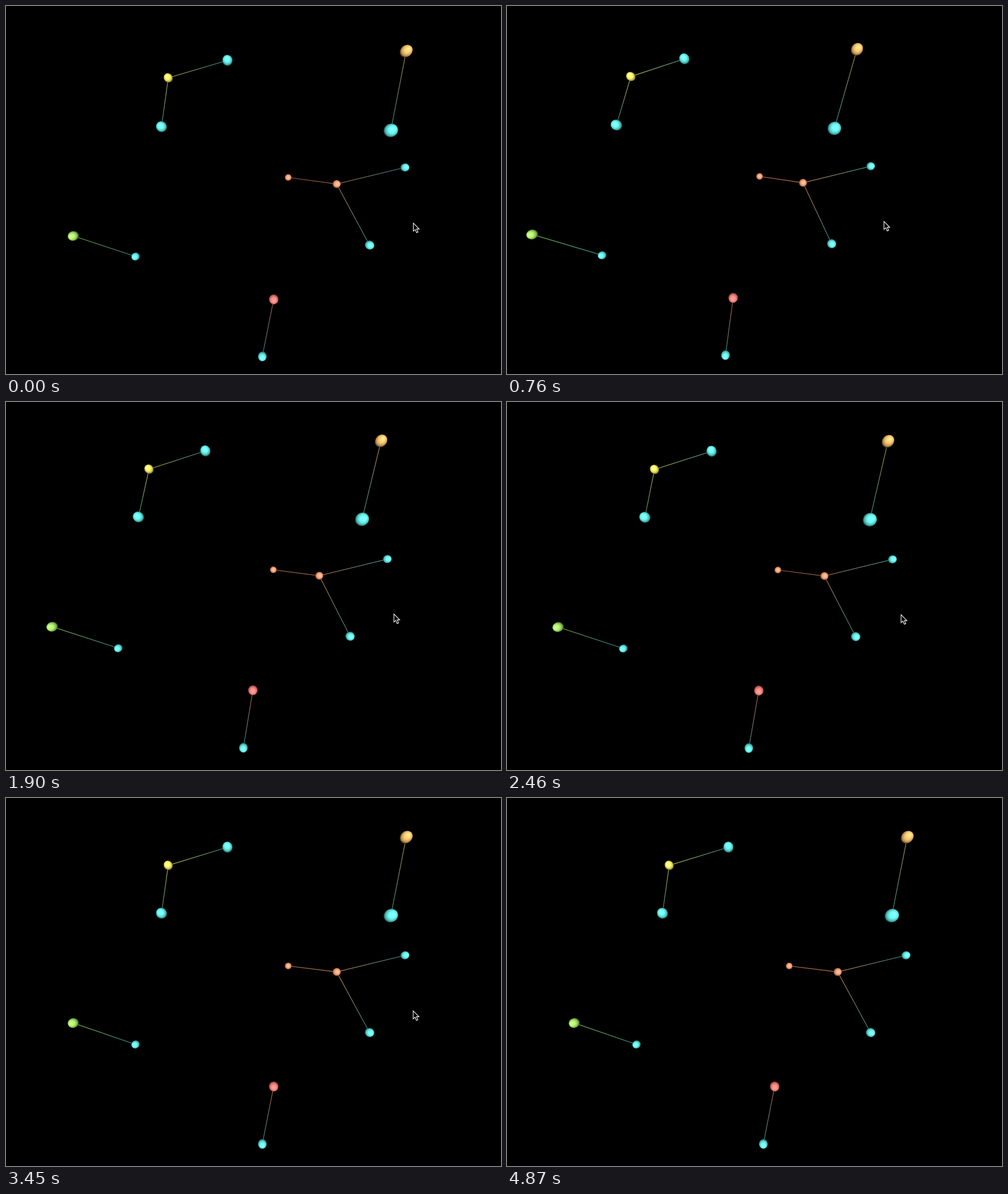
An HTML page with a canvas for the animation above (5200 ms loop, 868 by 645 pixels).

```html
<!DOCTYPE html>
<html>
<head>
<meta charset="utf-8">
<style>
  html, body { margin: 0; width: 100%; height: 100%; overflow: hidden; background: #000; }
  canvas { display: block; }
</style>
</head>
<body>
<canvas id="stage" width="868" height="645"></canvas>
<script>
const ctx = document.getElementById('stage').getContext('2d');
const W = 868, H = 645, LOOP = 5200;
const FOCAL = H / 2 / Math.tan(Math.PI / 6);

const TEAL = [92, 242, 234], YELLOW = [250, 240, 96], ORANGE = [252, 192, 100],
      GREEN = [164, 234, 96], SALMON = [255, 158, 112], RED = [255, 122, 116];

// near: pixels moved per unit of camera pan, which also sets the size
const ball = (x, y, near, color = TEAL) => ({ x, y, near, color });

// Each molecule is a hub followed by the balls tied to it
const molecules = [
  [ball(284.5, 126, 67.5, YELLOW), ball(388.3, 95.3, 77.5), ball(272.7, 211.5, 81)],
  [ball(701.8, 79, 88.3, ORANGE), ball(674.8, 218, 101)],
  [ball(579.8, 312, 61, SALMON), ball(494.8, 300.5, 52, SALMON), ball(699.5, 283, 62), ball(637.5, 419, 68.5)],
  [ball(118, 403, 74, GREEN), ball(227.2, 439, 60.5)],
  [ball(469.4, 514, 73, RED), ball(449.5, 614, 66.5)]
];

// Swing smoothly between turning points [time, value]
function swing(t, ...turns) {
  const i = turns.findIndex(([time]) => time > t);
  if (i < 0) return turns[turns.length - 1][1];
  if (i === 0) return turns[0][1];
  const [t0, a] = turns[i - 1], [t1, b] = turns[i];
  return a + (b - a) * (1 - Math.cos(Math.PI * (t - t0) / (t1 - t0))) / 2;
}

const panX = t => swing(t, [0, 0], [548, -1.6], [1290, 1.574], [1340, 1.574],
  [2075, -.815], [2140, -.815], [2850, .204], [3000, .204], [3450, 0]);
const panY = t => swing(t, [30, 0], [2100, -.126], [2850, -.104], [3000, -.104], [3450, -.117]);
const cursorX = t => swing(t, [0, 714.3], [495, 599.5], [1260, 827.5], [1300, 827.5],
  [2089, 657.5], [2140, 657.5], [2820, 731], [3000, 731], [3420, 714], [3570, 714], [4010, 851]);
const cursorY = t => swing(t, [0, 380.6], [1950, 371.6], [2850, 373.6], [3570, 373],
  [4010, 564.6], [4220, 564.6], [4400, 544], [4870, 648]);

const shade = (color, k, add = 0) => `rgb(${color.map(v => Math.min(255, Math.round(v * k + add)))})`;

function drawLink(a, b) {
  const g = ctx.createLinearGradient(a.x, a.y, b.x, b.y);
  g.addColorStop(0, shade(a.color, .74));
  g.addColorStop(1, shade(b.color, .6));
  ctx.strokeStyle = g;
  ctx.lineWidth = 1.15;
  ctx.beginPath();
  ctx.moveTo(a.x, a.y);
  ctx.lineTo(b.x, b.y);
  ctx.stroke();
}

// A sphere seen off axis: stretched away from the centre and lit along the view axis
function drawBall({ x, y, near, color }) {
  const dx = x - W / 2, dy = y - H / 2, dist = Math.hypot(dx, dy);
  const r = near * .115, stretch = Math.hypot(1, dist / FOCAL), s = dist / Math.hypot(dist, FOCAL);
  const g = ctx.createRadialGradient(s, 0, 0, .2 * s, 0, 1 + .1 * s);
  for (let i = 0; i <= 10; i++) {
    const d = i / 10;
    g.addColorStop(d, shade(color, .28 + .77 * Math.sqrt(1 - d * d), 42 * (1 - d)));
  }
  ctx.save();
  ctx.translate(x, y);
  ctx.rotate(Math.atan2(dy, dx));
  ctx.scale(r * stretch, r);
  ctx.fillStyle = g;
  ctx.beginPath();
  ctx.arc(0, 0, 1, 0, 7);
  ctx.fill();
  ctx.restore();
}

const arrow = new Path2D('M0 0V14L3.2 11.2L5.7 16.7L8.2 15.6L5.8 10.3H10.2Z');
function drawCursor(x, y) {
  ctx.save();
  ctx.translate(x, y);
  ctx.fillStyle = '#000';
  ctx.strokeStyle = '#fff';
  ctx.lineWidth = 1.1;
  ctx.fill(arrow);
  ctx.stroke(arrow);
  ctx.restore();
}

function frame(t) {
  const px = panX(t), py = panY(t);
  ctx.fillStyle = '#000';
  ctx.fillRect(0, 0, W, H);
  for (const molecule of molecules) {
    const [hub, ...leaves] = molecule.map(b => ({ ...b, x: b.x + b.near * px, y: b.y + b.near * py }));
    leaves.forEach(leaf => drawLink(hub, leaf));
    [hub, ...leaves].forEach(drawBall);
  }
  drawCursor(cursorX(t), cursorY(t));
}

const start = performance.now();
function tick() {
  frame((performance.now() - start) % LOOP);
  requestAnimationFrame(tick);
}
tick();
</script>
</body>
</html>
```
